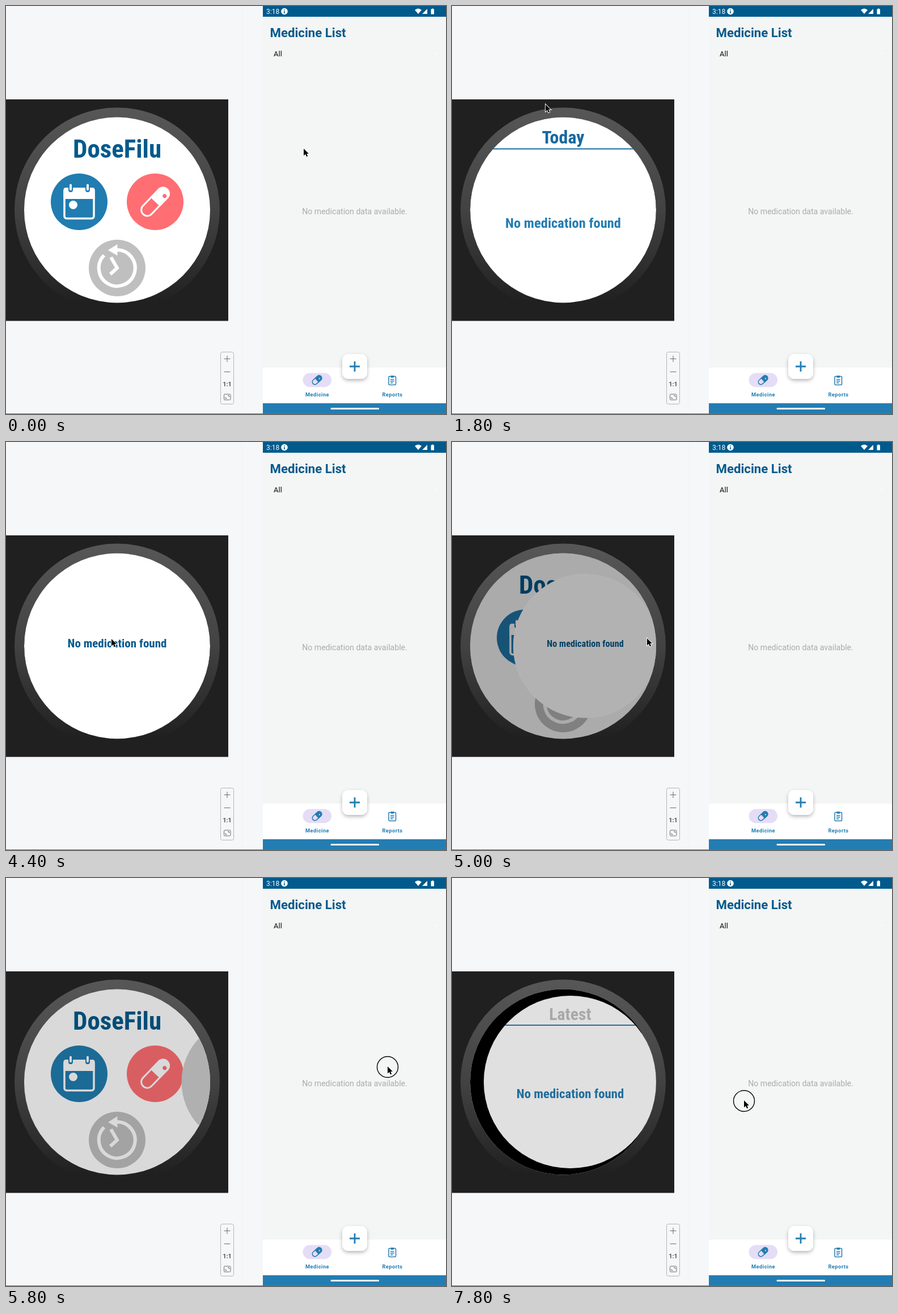
These frames come from a looping animation (776x721 px, 8000 ms). An HTML page:

```html
<!DOCTYPE html>
<html lang="en">
<head>
<meta charset="utf-8">
<title>Watch and phone demo</title>
<style>
html, body { margin: 0; width: 100%; height: 100%; overflow: hidden; background: #f6f7f8; }
svg { display: block; width: 776px; height: 721px; }
text { font-family: Roboto, sans-serif; }
.cond text { font-family: "Roboto Condensed", Roboto, sans-serif; font-stretch: 75%; font-weight: 600; }
.mid { text-anchor: middle; }
.nav { font-size: 9.3px; font-weight: 700; letter-spacing: .45px; fill: #237db2; }
.line { fill: none; stroke: #fff; }
</style>
</head>
<body>
<svg viewBox="0 0 776 721">
  <defs>
    <linearGradient id="bezel" x1="0" y1="0" x2="0" y2="1">
      <stop offset="0" stop-color="#575757"/>
      <stop offset=".5" stop-color="#424242"/>
      <stop offset=".75" stop-color="#303030"/>
      <stop offset=".95" stop-color="#202020"/>
    </linearGradient>
    <clipPath id="face"><circle cx="196" cy="360.5" r="164"/></clipPath>
    <clipPath id="round"><circle cx="196" cy="360.5" r="164"/></clipPath>
    <filter id="soft" x="-40%" y="-40%" width="180%" height="190%">
      <feDropShadow dx="0" dy="3" stdDeviation="3" flood-opacity=".28"/>
    </filter>
  </defs>

  <rect width="776" height="721" fill="#f6f7f8"/>
  <path d="M416.5 0V721" stroke="#f1f2f3"/>

  <!-- zoom panel -->
  <g fill="none" stroke="#6a6a6a">
    <rect x="378.5" y="611.5" width="23" height="92" rx="3" stroke="#b4b4b4"/>
    <path d="M384.5 623.5h11M390 618v11M384.5 646.5h11"/>
    <rect x="384.5" y="686" width="11.5" height="10" rx="1.5"/>
    <path d="M387 691v2.500h2.500M391 688.500h2.500v2.500"/>
  </g>
  <text class="mid" x="390" y="672" font-size="11" font-weight="600" fill="#555">1:1</text>

  <!-- watch -->
  <rect y="165" width="392" height="391.500" fill="#202020"/>
  <circle cx="196" cy="360.500" r="181" fill="url(#bezel)"/>
  <g clip-path="url(#face)" class="cond">
    <rect x="32" y="196" width="328" height="329" fill="#fff"/>
    <text class="mid" x="196" y="268" font-size="45" fill="#005a8c">DoseFilu</text>

    <circle cx="129" cy="346" r="50" fill="#217cb0"/>
    <rect x="103" y="323" width="52" height="52.500" rx="4" class="line" stroke-width="3.500"/>
    <path d="M101.500 341V325q0-4 4-4h47q4 0 4 4v16z" fill="#fff"/>
    <path d="M114 316v9M144 316v9" stroke="#217cb0" stroke-width="8" stroke-linecap="round"/>
    <path d="M114 316.500v7.500M144 316.500v7.500" stroke="#fff" stroke-width="4" stroke-linecap="round"/>
    <circle cx="118.500" cy="351.500" r="7.500" fill="#fff"/>

    <circle cx="263" cy="346" r="50" fill="#ff6e72"/>
    <g transform="translate(263 346) rotate(-46)">
      <rect x="-30.500" y="-10.500" width="61" height="21" rx="10.500" class="line" stroke-width="3"/>
      <path d="M0-12H20a12 12 0 0 1 0 24H0z" fill="#fff"/>
      <circle cx="19" cy="5" r="3.500" fill="#ff6e72"/>
    </g>

    <circle cx="196" cy="463" r="50" fill="#bfbfbf"/>
    <path d="M196 431a32 32 0 1 1-23 9.500" class="line" stroke-width="6"/>
    <path d="M180 431.500L196.500 421v20z" fill="#fff"/>
    <path d="M185 444l11 19-12 11" class="line" stroke-width="6"/>

    <rect id="scrim" x="32" y="196" width="328" height="329"/>
    <g id="page">
      <rect x="32" y="196" width="328" height="329" fill="#fff"/>
      <path id="rule" d="M32 252.500H360" stroke="#166a9f" stroke-width="2"/>
      <text id="head" class="mid" x="196" y="243" font-size="32"></text>
      <text id="note" class="mid" x="196">No medication found</text>
      <rect id="dim" x="32" y="196" width="328" height="329"/>
    </g>
  </g>

  <!-- phone -->
  <rect x="453" width="323" height="721" fill="#f4f5f5"/>
  <rect x="453" width="323" height="19" fill="#005a8c"/>
  <text x="459" y="14" font-size="12" fill="#fff">3:18</text>
  <circle cx="491" cy="9.500" r="5.800" fill="#fff"/>
  <path d="M491 6v1.500M491 8.800v4.200" stroke="#005a8c" stroke-width="1.600"/>
  <path d="M721 7q6-5 12 0l-6 7zM734 14h9V5zM749.500 5.500h1.500V4.500h2.500v1h1.500v9h-5.500z" fill="#fff"/>
  <text x="465.500" y="55" font-size="22.200" font-weight="700" fill="#005a8c">Medicine List</text>
  <text x="472" y="89" font-size="13" fill="#111">All</text>
  <path d="M757 83h4l-2 3z" fill="#fff"/>
  <text class="mid" x="615" y="368" font-size="14.100" fill="#ababab">No medication data available.</text>

  <rect x="453" y="639" width="323" height="63" fill="#fff"/>
  <rect x="453" y="702" width="323" height="19" fill="#237db2"/>
  <path d="M574 711.500h82.500" stroke="#fff" stroke-width="3" stroke-linecap="round"/>
  <rect x="593" y="615" width="44" height="44" rx="11" fill="#fff" filter="url(#soft)"/>
  <path d="M606 637h18M615 628v18" stroke="#237db2" stroke-width="2.800"/>

  <rect x="523.500" y="648.500" width="50.500" height="25" rx="12.500" fill="#e5ddf6"/>
  <g transform="translate(548.500 661) rotate(-42)" stroke="#237db2" stroke-width="1.600">
    <rect x="-9.500" y="-4.500" width="19" height="9" rx="4.500" fill="none"/>
    <path d="M0-4.500h5a4.500 4.500 0 0 1 0 9H0z" fill="#237db2"/>
    <circle cx="5" cy="1" r="1" fill="#fff" stroke="none"/>
  </g>
  <text class="nav mid" x="549" y="689.500">Medicine</text>

  <g fill="none" stroke="#237db2" stroke-width="1.500">
    <rect x="675" y="654.500" width="12.500" height="15" rx="1.500"/>
    <path d="M678 660h6.500M678 663h6.500M678 666h4.500"/>
    <path d="M678.500 655h5.500" stroke-width="3.500"/>
  </g>
  <text class="nav mid" x="681.500" y="689.500">Reports</text>
  <path d="M0 720.500H776" stroke="#6b7075"/>

  <g id="cursor">
    <circle id="ring" cy="1" r="18.500" fill="none" stroke="#000" stroke-width="1.400"/>
    <path d="M0 0V12.500L3 9.800 5 14.300 7.200 13.300 5.200 9H9z" stroke="#fff" stroke-width="1.800" paint-order="stroke"/>
  </g>
</svg>
<script>
const LOOP = 8000, TICK = 200;
const $ = id => document.getElementById(id);
const set = (id, attrs) => {
  for (const k in attrs) $(id).setAttribute(k, attrs[k]);
};

const PAGES = {
  today: { head: "Today", color: "#166a9f", note: "#237db2", size: 24.5, y: 391.5 },
  pills: { head: "", color: "#005a8c", note: "#005a8c", size: 21, y: 363 },
  latest: { head: "Latest", color: "#bfbfbf", note: "#237db2", size: 24.5, y: 391.5 }
};

// Poses of the page on top: scale, shift, dimming, scrim behind it
const OPEN = [0.908, 0, 0.07, 1], FULL = [1, 0, 0, 1], PULL = [0.93, 12.5, 0.12, 1];
const drag = k => [0.775 - 0.089 * k, 39 + 187 * k, 0.3 + 0.01 * k, 0.33 - 0.18 * k];

const views = [
  [0], [1000, "today", OPEN], [1200, "today", FULL], [2200, "today", PULL],
  [2400], [4000, "pills", OPEN], [4200, "pills", FULL], [4800, "pills", PULL],
  [5000, "pills", drag(0)], [5200, "pills", drag(0.3)], [5400, "pills", drag(0.55)],
  [5600, "pills", drag(0.78)], [5800, "pills", drag(1)],
  [6000], [6800, "latest", OPEN], [7000, "latest", FULL], [7800, "latest", PULL]
];

// Pointer path: time, x, y
const path = [
  [0, 525, 252], [200, 440, 280], [600, 170, 342], [800, 130, 348], [1400, 132, 342],
  [1800, 165, 174], [2000, 110, 330], [2200, 519, 372], [2400, 478, 366], [3000, 478, 366],
  [3200, 300, 330], [3400, 189, 297], [3800, 262, 346], [4200, 262, 346], [4600, 110, 350],
  [5000, 344, 347], [5400, 519, 341], [5800, 673, 333], [6000, 520, 370], [6400, 210, 465],
  [6800, 205, 475], [7200, 110, 410], [7400, 100, 402], [7800, 515, 393], [8000, 515, 393]
];
const pressed = [2200, 5400, 5600, 5800, 7800];

function pointer(t) {
  const i = path.findIndex(p => p[0] > t);
  const [t0, x0, y0] = path[i - 1], [t1, x1, y1] = path[i];
  const k = (t - t0) / (t1 - t0);
  return [x0 + (x1 - x0) * k, y0 + (y1 - y0) * k];
}

function draw(t) {
  const [, name, pose] = views.filter(v => v[0] <= t).pop();
  $("page").style.display = name ? "" : "none";
  set("scrim", { opacity: name ? pose[3] : 0 });
  if (name) {
    const p = PAGES[name], [scale, dx, dim] = pose;
    set("page", {
      transform: `translate(${196 + dx} 360.5) scale(${scale}) translate(-196 -360.5)`,
      "clip-path": pose === OPEN ? "none" : "url(#round)"
    });
    $("head").textContent = p.head;
    set("head", { fill: p.color });
    set("rule", { opacity: p.head ? 1 : 0 });
    set("note", { fill: p.note, "font-size": p.size, y: p.y });
    set("dim", { opacity: dim });
  }
  set("cursor", { transform: `translate(${pointer(t)})` });
  set("ring", { opacity: pressed.includes(t) ? 1 : 0 });
}

const start = performance.now();
let last = -1;
function loop() {
  const t = Math.floor(((performance.now() - start) % LOOP) / TICK) * TICK;
  if (t !== last) draw(last = t);
  requestAnimationFrame(loop);
}
loop();
</script>
</body>
</html>
```
